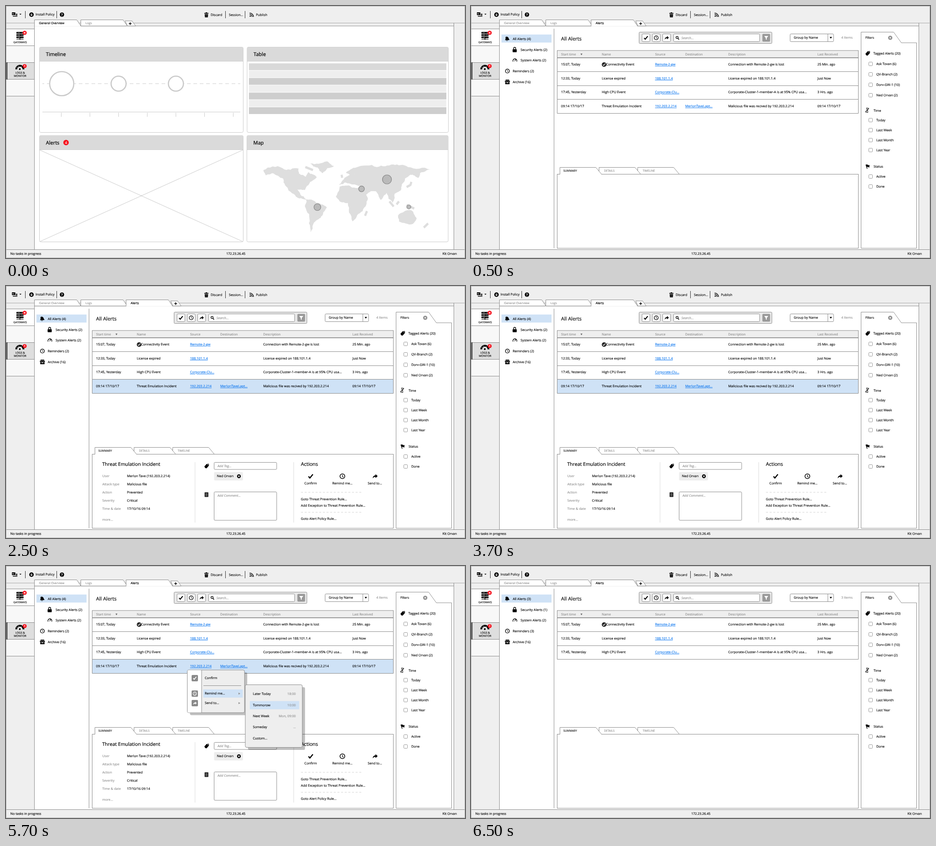
An HTML page for the animation above (8 s loop, 1009 by 555 pixels).

```html
<!DOCTYPE html>
<html lang="en">
<head>
<meta charset="utf-8">
<title>Alert console</title>
<style>
html, body { margin: 0; width: 100%; height: 100%; overflow: hidden; background: #efefef; }
svg { display: block; width: 1009px; height: 555px; }
text { font-family: "Open Sans", "Noto Sans", sans-serif; text-rendering: geometricPrecision; white-space: pre; }
</style>
</head>
<body>
<svg id="stage" viewBox="0 0 1009 555"></svg>
<script>
const LINE = '#8c8c8c', GREY = '#858585', PALE = '#cbcbcb', INK = '#000', RED = '#f5101c', BLUE = '#cfe2f6', LINK = '#0070ee';
const LOOP = 8000, CUTS = [0, 500, 2500, 4500, 6500];

// y is the middle of the capitals; a hairline stroke gives the slightly heavier type
function text(x, y, str, { size = 7.25, fill = INK, anchor = 'start', weight = .14, extra = '' } = {}) {
  const safe = str.replace(/&/g, '&amp;');
  return `<text x="${x}" y="${(y + size * .357).toFixed(2)}" font-size="${size}" fill="${fill}" stroke="${fill}" stroke-width="${weight}" text-anchor="${anchor}" ${extra}>${safe}</text>`;
}
const grey = (x, y, str, opts) => text(x, y, str, { fill: GREY, weight: .08, ...opts });
const path = (d, fill = 'none', stroke = LINE, width = 1, extra = '') =>
  `<path d="${d}" fill="${fill}" stroke="${stroke}" stroke-width="${width}" ${extra}/>`;
const solid = (d, fill = INK) => path(d, fill, 'none');
const rect = (x, y, w, h, fill = '#fff', stroke = 'none', r = 0) =>
  `<rect x="${x}" y="${y}" width="${w}" height="${h}" rx="${r}" fill="${fill}" stroke="${stroke}"/>`;
const circle = (x, y, r, fill = INK, stroke = 'none', width = 1) =>
  `<circle cx="${x}" cy="${y}" r="${r}" fill="${fill}" stroke="${stroke}" stroke-width="${width}"/>`;
const group = (states, body) => `<g data-states="${states}">${body}</g>`;
const bound = (key, body) => body.replace('<text', `<text data-key="${key}"`);
const repeat = (count, draw) => Array.from({ length: count }, (_, i) => draw(i)).join('');

const icon = {
  check: c => path('M-4 .3L-1.5 3.2L4-3.5', 'none', c, 2),
  clock: c => circle(0, 0, 4.4, 'none', c, 1.3) + path('M0-2.8V.3L2 1.8', 'none', c, 1),
  share: c => solid('M-4 4C-4 0-1.5-1.5 1-1.5V-4L5-.2L1 3.4V1C-1 .8-3 2-4 4Z', c),
  cross: c => path('M-1.7-1.7L1.7 1.7M1.7-1.7L-1.7 1.7', 'none', c, 1.2),
  tag: () => solid('M-5 1L0-4.5L5-5L5-1L0 5L-3 4.5Z') + circle(3, -3, .9, '#fff'),
  gauge: c => path('M-4 3A4.4 4.4 0 1 1 4 3M-.5 2L2-2', 'none', c, 1.4),
  bell: () => solid('M-4-4C-2-6 3-4 3 0L5 2L2 3L-5 3L-4 0ZM-3 3.5L1 4L-1 5Z'),
  lock: () => rect(-4.5, -1, 9, 6.5, INK, 'none', 1) + path('M-2.3-.5V-3A2.3 2.3 0 0 1 2.3-3V-.5', 'none', INK, 1.4),
  box: () => solid('M-4-5H4V-3H-4ZM-5.5-2.5H5.5V0H-5.5ZM-4.7.5H4.7V5H-4.7Z') + rect(-1.8, 1, 3.6, 1.3),
  hourglass: () => path('M-2-5L4-4M-4 4L2 5M-1-4C-2 0 3 0 1 4M3-4C3 0-4 0-3 4', 'none', INK, 1.2),
  flag: () => path('M-4-4L-1 5', 'none', INK, 1.3) + solid('M-4-4C-1-6 1-2 5-3L3 0L5 1C2 3 0 0-2 1Z'),
  note: () => rect(-4, -5, 8, 10, INK) + path('M-2.5-2.5H2.5M-2.5 0H2.5M-2.5 2.5H2.5', 'none', '#fff', .8),
};
const use = (name, x, y, color = INK, scale = 1) =>
  `<g transform="translate(${x} ${y}) scale(${scale})">${icon[name](color)}</g>`;

function toolbar() {
  return rect(13, 14, 7.5, 6, INK) + path('M14.5 16V18L16 17L17 18V16', 'none', '#fff', .8) +
    path('M21.5 17.7H25M21.5 20H25M15 22.6H25', 'none', INK, 1.5) + solid('M29.5 17H34L31.7 19.5Z') +
    path('M42.5 11V27M111.5 11V27M482.5 11V27M525.5 11V27', 'none', '#333') +
    circle(56, 19, 4.9) + path('M56 16V21M53.8 19L56 21.3L58.2 19', 'none', '#fff', 1.1) +
    text(65, 18.7, 'Install Policy') +
    circle(123, 19, 4.8) + text(123, 19, '?', { size: 7.5, fill: '#fff', anchor: 'middle', extra: 'font-weight="700"' }) +
    solid('M436 15.2H439V14H442V15.2H445V17H436ZM436.7 18H444.3L443.6 25H437.4Z') +
    path('M439 19L439.3 24M442 19L441.7 24', 'none', '#aaa', .6) +
    circle(537, 22.3, 1.4) + path('M535.5 18.5A5 5 0 0 1 541 24M535.5 15.5A8.2 8.2 0 0 1 544 24', 'none', INK, 1.4) +
    text(450, 19, 'Discard') + text(490, 19, 'Session...') + text(549.5, 19, 'Publish');
}

function sidebar() {
  const small = { size: 5.95, anchor: 'middle' };
  const fills = ['#fff', '#f8f8f8', '#dedede', '#f8f8f8'];
  return repeat(4, i => rect(0, 50.5 + i * 37, 62.5, 37, fills[i], LINE)) + rect(0, 124, 3, 38, '#333') +
    repeat(3, i => rect(23, 57 + i * 5, 15.5, 4, INK, 'none', .7) + path(`M25 ${59 + i * 5}H31M34 ${59 + i * 5}H36.5`, 'none', '#ddd', .8)) +
    path('M23 73.3H38.5M30.7 71V73', 'none', INK) + circle(30.7, 73, 1.2) +
    circle(41, 59, 4.6, RED) + use('cross', 41, 59, '#fff') +
    text(31, 79.5, 'GATEWAYS', small) +
    path('M22.5 139.5A8 8 0 0 1 38.5 139.5', 'none', INK, 4) + path('M30 139.5L34 133', 'none', '#dedede', 1.2) +
    path('M27.5 131.5L28.6 135.5M23 134.5L25.5 136.5', 'none', '#dedede', .8) + circle(30.3, 139, 2) +
    circle(41, 132.3, 4.4, RED) + bound('badge', text(41, 132.3, '4', { size: 6, fill: '#fff', anchor: 'middle' })) +
    text(31, 146.5, 'LOGS &', small) + text(31, 154, 'MONITOR', small);
}

function chrome() {
  return rect(0, 0, 1009, 555, '#efefef') + path('M0 37.5H1009', 'none', '#a8a8a8') +
    rect(62.5, 44, 922, 492.5) + sidebar() + path('M62.5 37V536.5M984.5 37V536.5M62.5 44H984.5') + toolbar() +
    path('M0 536.5H1009') +
    text(9.5, 545.5, 'No tasks in progress', { size: 7.2 }) +
    text(505.3, 545.5, '172.23.26.45', { size: 7.1, anchor: 'middle' }) +
    text(991, 545.5, 'Kit Orvan', { anchor: 'end' }) +
    rect(.5, .5, 1008, 554, 'none', '#b5b5b5');
}

function topTab(x, label, active) {
  return path(`M${x} 44V30.5H${x + 93}L${x + 102} 44`, '#fff') +
    path(`M${x + .5} 44H${x + 101}`, 'none', active ? '#fff' : LINE, active ? 1.6 : 1) +
    text(x + 10, 37.5, label, { size: 6.75, fill: active ? INK : GREY, weight: active ? .2 : .08 });
}
const plusTab = x => path(`M${x} 32.8H${x + 15}L${x + 23} 44H${x + 5}Z`, '#fff') +
  path(`M${x + 8} 38.7H${x + 14}M${x + 11} 35.7V41.7`, 'none', INK, 1.4);

// Key corners in degrees of longitude and latitude; the coast between them is roughened
const LANDS = [
  '-168 66,-128 70,-94 69,-93 59,-79 53,-74 62,-56 52,-70 43,-81 27,-97 28,-90 18,-78 8,-105 20,-122 36,-126 49,-148 60,-163 56',
  '-70 79,-35 83,-20 74,-44 60,-54 71',
  '-78 9,-50 1,-35 -7,-48 -27,-64 -41,-69 -55,-72 -20,-81 -4',
  '-16 15,-8 34,11 36,33 31,51 11,40 -14,19 -34,9 2,-8 5',
  '-9 37,-3 45,10 55,24 59,15 56,5 61,26 71,70 72,104 77,135 72,182 67,160 60,157 51,140 57,122 38,120 27,107 20,103 2,90 22,78 8,67 25,57 25,45 13,35 35,24 38,3 42',
  '114 -23,136 -12,143 -13,153 -28,145 -39,116 -34',
];
const ISLANDS = 'M-80 72L-64 66M-3 51L-4 57M45 -23L49 -14M132 33L140 37L142 43M96 5L105 -5M111 -1L116 5M132 -2L148 -9M168 -46L177 -38';

function seeded(seed) {
  return () => (seed = (seed * 16807) % 2147483647) / 2147483647;
}
function coast(points, random, depth) {
  if (!depth) return points;
  const finer = points.flatMap(([x, y], i) => {
    const [u, v] = points[(i + 1) % points.length], bend = (random() - .5) * .26;
    return [[x, y], [(x + u) / 2 + (v - y) * bend, (y + v) / 2 - (u - x) * bend]];
  });
  return coast(finer, random, depth - 1);
}
function worldMap() {
  const random = seeded(29);
  const outlines = LANDS.map(land => 'M' + coast(land.split(',').map(p => p.split(' ').map(Number)), random, 3)
    .map(p => p.map(n => n.toFixed(1)).join(' ')).join('L') + 'Z').join('');
  const spot = (x, y, r) => circle(x, y, r, '#bababa', '#858585', 1.2);
  return `<g transform="translate(742 436) scale(1.05 -1.13)">${solid(outlines, '#dedede')}${path(ISLANDS, 'none', '#dedede', 4.5)}</g>` +
    spot(837.5, 382, 10) + spot(781.5, 402.7, 6.4) + spot(684.5, 443, 7.5) + spot(885.5, 442.5, 4.5);
}

function overview() {
  const panel = (x, y, w, h, label) => rect(x, y, w, h, '#fff', PALE, 3) +
    solid(`M${x} ${y + 31}V${y + 3}Q${x} ${y} ${x + 3} ${y}H${x + w - 3}Q${x + w} ${y} ${x + w} ${y + 3}V${y + 31}Z`, '#dadada') +
    path(`M${x} ${y + 31.2}H${x + w}`, 'none', PALE) + text(x + 14.3, y + 15.7, label, { size: 11, weight: .25 });
  const ring = (x, r) => circle(x, 171, r, '#fff', '#cacaca', 2.6);
  return topTab(164.5, 'Logs') + plusTab(262) + topTab(62.5, 'General Overview', true) +
    panel(73.5, 90.5, 448, 188, 'Timeline') + panel(530, 90.5, 442.5, 188, 'Table') +
    panel(73.5, 285.2, 448, 234.3, 'Alerts') + panel(529.5, 285.2, 442.5, 234.3, 'Map') +
    path('M80 171H515', 'none', PALE, 1, 'stroke-dasharray="8 6" stroke-dashoffset="4"') +
    ring(122.5, 26.5) + ring(247.5, 16.5) + ring(373.5, 16.5) +
    path('M80 233.5H515' + repeat(7, i => `M${121.5 + i * 63} 235V244`), 'none', PALE) +
    repeat(7, i => rect(534, 126.3 + i * 16.1, 434, 15, i % 2 ? '#eee' : i ? '#cecece' : '#d9d9d9')) +
    circle(132, 300.7, 6, RED) + text(132, 300.7, '4', { size: 8, fill: '#fff', anchor: 'middle' }) +
    path('M74 317L521 519M521 317L74 519', 'none', PALE) + worldMap();
}

function navigation() {
  return rect(67, 62.8, 110, 17.7, BLUE) + path('M182.5 50V533.5') +
    use('bell', 80, 72.3) + bound('all', text(91.7, 72.3, '')) +
    use('lock', 96, 96.3) + bound('security', text(109, 96.3, '')) +
    use('gauge', 96.5, 119.5) + text(109, 119.5, 'System Alerts (2)') +
    use('clock', 80, 143.3) + bound('reminders', text(91.7, 143.3, '')) +
    use('box', 80, 167.3) + text(91.7, 167, 'Archive (16)');
}

function searchBar() {
  const button = (name, i) => rect(376 + i * 22.7, 61.5, 17.2, 17, '#fff', LINE, 2) + use(name, 384.5 + i * 22.7, 70);
  return text(198, 72, 'All Alerts', { size: 11 }) +
    rect(369.5, 57.5, 292, 25, '#e8e8e8', LINE, 2) + ['check', 'clock', 'share'].map(button).join('') +
    rect(445.5, 61.5, 189, 17, '#fff', LINE, 2) + circle(453, 69.2, 2.4, 'none', INK, 1.3) +
    path('M454.6 71L457.3 74', 'none', INK, 1.7) + grey(462.5, 70, 'Search...', { extra: 'font-style="italic"' }) +
    rect(640.5, 61.5, 17, 17, '#999', 'none', 2) + solid('M644.5 66H653.5L650 70.5V74.5L648 73.5V70.5Z', '#fff') +
    rect(701.5, 61.5, 95.5, 17, '#fff', LINE, 2) + path('M784.5 61.5V78.5') + solid('M788.5 68H793.5L791 72Z') +
    text(709.5, 69.8, 'Group by Name') + bound('items', grey(814, 69.8, ''));
}

const COLUMNS = [198, 287.5, 404.7, 471, 565.5, 761.5];
const ROWS = [
  ['15:07, Today', '     Connectivity Event', 'Remote-2-gw', '', 'Connection with Remote-2-gw is lost', '25 Min. ago'],
  ['12:33, Today', 'License expired', '188.101.1.4', '', 'License expired on 188.101.1.4', 'Just Now'],
  ['17:45, Yesterday', 'High CPU Event', 'Corporate-Clu...', '', 'Corporate-Cluster-1-member-A is at 95% CPU usa...', '3 Hrs. ago'],
  ['09:14 17/10/17', 'Threat Emulation Incident', '192.203.2.214', 'MerlonTaveLapt...', 'Malicious file was recived by 192.203.2.214', '09:14 17/10/17'],
];
function row(cells, i) {
  const link = { fill: LINK, extra: 'text-decoration="underline"' };
  const top = Math.round(114 + i * 30.6) - .5;
  return path(`M189.5 ${top}V${top + 31}H851.5V${top}`) +
    cells.map((str, c) => text(COLUMNS[c], 128.6 + i * 30.65, str, c === 2 || c === 3 ? link : {})).join('');
}
function table() {
  const heads = ['Start time', 'Name', 'Source', 'Destination', 'Description', 'Last Received'];
  return rect(189.5, 98, 662, 16, '#eee', LINE) + heads.map((h, i) => grey(COLUMNS[i], 106.3, h, { size: 7.15 })).join('') +
    solid('M240.7 104.8H245L242.8 108.6Z', '#666') +
    group('2 3', rect(189.5, 205.5, 662, 31, BLUE)) +
    ROWS.slice(0, 3).map(row).join('') + group('1 2 3', row(ROWS[3], 3)) +
    path('M189.5 114H851.5', 'none', LINE, 1.5) +
    circle(292.6, 129, 5.1, '#222') + use('check', 292.6, 129, '#fff', .65);
}

function filters() {
  const options = (y, step, list) => list.map((label, i) =>
    rect(874.5, y + i * step - 4, 8, 8, '#fff', '#999', 1) + text(891, y + i * step, label)).join('');
  return path('M857.5 57.5H929L946 81H979.5V533.5H857.5Z', '#fff') +
    text(867, 70, 'Filters', { size: 6.8 }) + circle(921.6, 70, 4.6, '#8c8c8c') + use('cross', 921.6, 70, '#fff') +
    use('tag', 872, 104.3) + text(884.5, 104.3, 'Tagged Alerts (20)') +
    options(127.5, 23, ['Ask Tovan (6)', 'QV-Branch (2)', 'Dorv-GW-1 (10)', 'Ned Orvan (2)']) +
    use('hourglass', 871, 229.5) + text(885, 230, 'Time') +
    options(251.3, 22, ['Today', 'Last Week', 'Last Month', 'Last Year']) +
    use('flag', 872, 353.5) + text(885, 353.5, 'Status') + options(375.5, 22, ['Active', 'Done']);
}

function detailFrame() {
  const tab = (x, label, color) => path(`M${x} 370.5V355.5H${x + 79}L${x + 91.5} 370.5`, '#fff') +
    text(x + (color === INK ? 7.5 : 11), 362.7, label, { size: 6.15, fill: color, weight: .1 });
  return tab(366.5, 'TIMELINE', GREY) + tab(281.5, 'DETAILS', GREY) +
    rect(189.5, 370.5, 662, 163, '#fff', LINE) +
    tab(195.5, 'SUMMARY', INK) + path('M196 370.5H286', 'none', '#fff', 1.6);
}

function summary() {
  const fields = [['User', 'Merlon Tave (192.203.2.214)'], ['Attack type', 'Malicious file'], ['Action', 'Prevented'],
    ['Severity', 'Critical'], ['Time & date', '17/10/16 09:14']];
  const italic = { extra: 'font-style="italic"' };
  const action = (name, x, label) => use(name, x, 419, INK, 1.2) + text(x, 434.5, label, { anchor: 'middle' });
  return text(211.5, 392.5, 'Threat Emulation Incident', { size: 10.6, weight: .2 }) +
    fields.map(([k, v], i) => grey(211.7, 418.7 + i * 17.9, k) + text(266, 418.7 + i * 17.9, v)).join('') +
    grey(211.7, 514, 'more...') + path('M415.5 388V521M632.5 388V521', 'none', '#dcdcdc') +
    use('tag', 441, 396.5) + rect(457.5, 388.5, 137.5, 15.5, '#fff', LINE, 2) + grey(465, 396.8, 'Add Tag...', italic) +
    rect(457.5, 409.7, 63.3, 18.5, '#ededed', 'none', 2) + text(463.5, 418.8, 'Ned Orvan') +
    circle(512, 419, 4.2) + use('cross', 512, 419, '#fff') +
    use('note', 440.7, 459.5) + rect(457.5, 453.5, 137.5, 62.5, '#fff', LINE, 2) + grey(465, 461.3, 'Add Comment...', italic) +
    text(648.3, 392.5, 'Actions', { size: 11, weight: .2 }) +
    action('check', 669.8, 'Confirm') + action('clock', 739.5, 'Remind me...') + action('share', 811, 'Send to...') +
    path('M648.5 454.3H782M648.5 498.3H782', 'none', '#d2d2d2', 1, 'stroke-dasharray="4.5 3.5"') +
    text(648.3, 469.2, 'Goto Threat Prevention Rule...') +
    text(648.3, 483.8, 'Add Exception to Threat Prevention Rule...') + text(648.3, 512, 'Goto Alert Policy Rule...');
}

function menus() {
  const sheet = (x, y, w, h) => rect(x + 6, y + 5.5, w, h, 'rgba(0,0,0,.25)', 'none', 3) + rect(x, y, w, h, '#eee', LINE, 3);
  const item = (name, y, label) => rect(408, y - 6.7, 14, 14, '#8a8a8a', 'none', 2) + use(name, 415, y + .3, '#fff', .85) + text(437, y, label);
  const arrow = y => solid(`M511 ${y - 2.3}L515.3 ${y}L511 ${y + 2.3}Z`, '#999');
  const later = [['Later Today', '18:00'], ['Tommorow', '10:00'], ['Next Week', 'Mon, 09:00'], ['Someday', '...'], ['Custom...', '']];
  return sheet(398.5, 229, 125.8, 94) + solid('M399 231.5Q399 229.5 401 229.5H430V322.5H401Q399 322.5 399 320.5Z', '#fff') +
    path('M430 229V323M434 263.5H517') + rect(433.5, 271.8, 87, 18, BLUE) +
    item('check', 246.6, 'Confirm') + item('clock', 280.8, 'Remind me...') + item('share', 301.8, 'Send to...') +
    arrow(281) + arrow(302) +
    sheet(526, 261.5, 125.3, 138) + rect(536, 297.5, 108.5, 18, BLUE) +
    later.map(([name, when], i) => text(542.7, 281.7 + i * 24.4, name) + grey(637, 281.7 + i * 24.4, when, { anchor: 'end' })).join('');
}

const stage = document.getElementById('stage');
stage.innerHTML = chrome() + group('0', overview()) +
  group('1 2 3 4', topTab(62.5, 'General Overview') + topTab(164.5, 'Logs') + plusTab(362) + topTab(264, 'Alerts', true) +
    navigation() + searchBar() + table() + filters() + detailFrame()) +
  group('2 3', summary()) + group('3', menus());

const groups = [...stage.querySelectorAll('[data-states]')].map(node => ({ node, states: node.dataset.states.split(' ').map(Number) }));
const labels = [...stage.querySelectorAll('[data-key]')];
let shown = -1;

function update(ms) {
  const state = CUTS.filter(cut => cut <= ms).length - 1;
  if (state === shown) return;
  shown = state;
  const done = state === 4, open = done ? 3 : 4;
  const values = {
    badge: `${open}`, all: `All Alerts (${open})`, items: `${open} Items`,
    security: `Security Alerts (${done ? 1 : 2})`, reminders: `Reminders (${done ? 3 : 2})`,
  };
  for (const { node, states } of groups) node.style.display = states.includes(state) ? '' : 'none';
  for (const label of labels) label.textContent = values[label.dataset.key];
}

const start = performance.now();
function tick() {
  update((performance.now() - start) % LOOP);
  requestAnimationFrame(tick);
}
tick();
</script>
</body>
</html>
```
